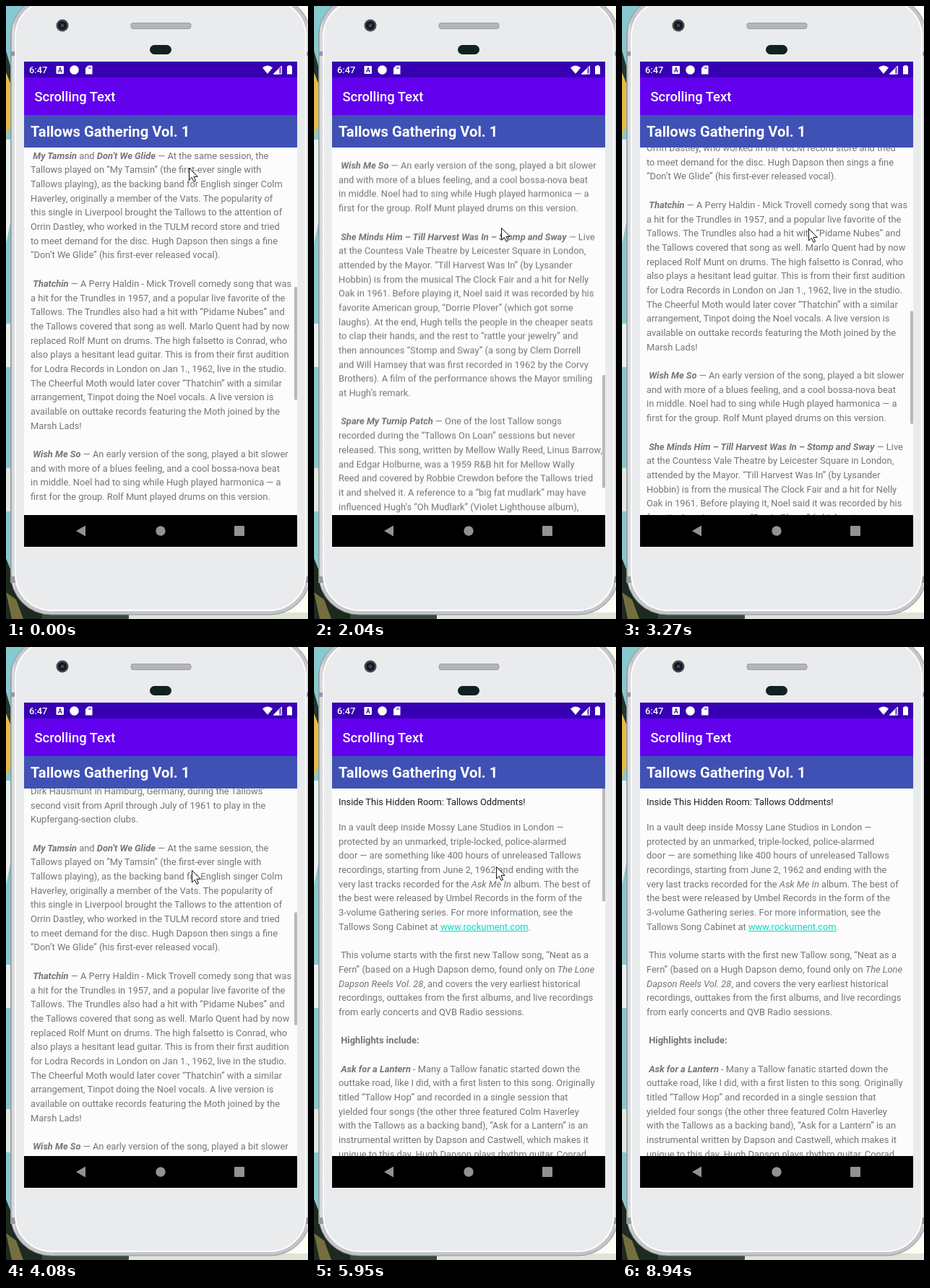
Animation of 418 by 849 pixels, one loop 9590 ms. Source, as an HTML page:

```html
<!DOCTYPE html>
<html lang="en">
<head>
<meta charset="utf-8">
<title>Scrolling Text</title>
<style>
  html, body { margin: 0; width: 100%; height: 100%; overflow: hidden; background: #fffdf3; }
  svg { position: absolute; left: 0; top: 0; display: block; }
  text, #view { font-family: Roboto, sans-serif; }
  #view { position: absolute; left: 25px; top: 196px; width: 378px; height: 509px;
          overflow: hidden; background: #fcfcfc; font-size: 12.87px; color: #757575; }
  #page { position: absolute; left: 9px; top: 0; white-space: pre; will-change: transform; }
  #intro { position: absolute; top: 8.6px; line-height: 20px; color: #1f1f1f; }
  #body { position: absolute; top: 44px; line-height: 19.69px; }
  #body b { font-weight: 700; }
  u { color: #03dac5; }
  #bar { position: absolute; right: 0; top: 0; width: 4px; height: 155.5px; background: #b9b9b9; }
  .glow { position: absolute; left: -40px; width: 458px; height: 64px; border-radius: 50%; background: #6200ee; opacity: 0; }
  #glowTop { top: -32px; }
  #glowBottom { bottom: -32px; }
</style>
</head>
<body>
<svg width="418" height="849" viewBox="0 0 418 849">
  <defs>
    <linearGradient id="rim">
      <stop offset="0" stop-color="#a9abb0"/><stop offset=".008" stop-color="#e3e4e7"/>
      <stop offset=".016" stop-color="#c3c5c9"/><stop offset=".984" stop-color="#c3c5c9"/>
      <stop offset=".992" stop-color="#e3e4e7"/><stop offset="1" stop-color="#a9abb0"/>
    </linearGradient>
  </defs>
  <!-- wallpaper -->
  <rect width="60" height="849" fill="#86c9cf"/>
  <path d="M0 62L8 90V130L0 118Z" fill="#20382f"/>
  <path d="M0 92L8 112V160L0 180Z" fill="#e5bd45"/>
  <path d="M0 185H8V290L0 330ZM0 440H8V500H0Z" fill="#e8f1ee"/>
  <path d="M0 640H8V700H0Z" fill="#dfe9df"/>
  <path d="M0 765L10 790L70 849H0Z" fill="#1d2a20"/>
  <path d="M0 812L14 822L24 849H8Z" fill="#756f3f"/>
  <path d="M50 840H240V849H50Z" fill="#39483a"/>
  <path d="M170 840H418V849H170Z" fill="#dfe4d8"/>
  <!-- phone -->
  <rect x="6.5" y="-14" width="415" height="857" rx="56" fill="url(#rim)" stroke="#8f9196"/>
  <path d="M6 63H14V69H6ZM6 790H14V799H6ZM413 63H418V69H413ZM413 790H418V799H413Z" fill="#96989d"/>
  <rect x="13" y="-8" width="402" height="845" rx="50" fill="#e9ebed" stroke="#fff" stroke-width="2"/>
  <circle cx="78" cy="27" r="8.5" fill="#45494e"/>
  <circle cx="78" cy="27" r="6" fill="#15181d"/>
  <circle cx="78" cy="27" r="2.5" fill="#2d4874"/>
  <rect x="173" y="23.500" width="83" height="8" rx="3" fill="#b4b5b7" stroke="#9b9c9f"/>
  <rect x="199" y="54" width="30" height="13" rx="6.500" fill="#10211f"/>
  <!-- screen -->
  <rect x="25" y="77" width="378" height="22" fill="#3700b3"/>
  <rect x="25" y="99" width="378" height="52" fill="#6200ee"/>
  <rect x="25" y="151" width="378" height="45" fill="#3f51b5"/>
  <rect x="25" y="705" width="378" height="44" fill="#000"/>
  <g fill="#fff">
    <text x="32" y="93" font-size="12.870" font-weight="500">6:47</text>
    <text x="39.500" y="132" font-size="18.400" font-weight="500">Scrolling Text</text>
    <text x="34" y="181.300" font-size="20.200" font-weight="700">Tallows Gathering Vol. 1</text>
    <rect x="69.500" y="83" width="10.500" height="11" rx="1.200"/>
    <text x="74.750" y="91.700" font-size="8.500" font-weight="700" text-anchor="middle" style="fill:#3700b3">A</text>
    <circle cx="94.500" cy="88.500" r="6.300"/>
    <path d="M113.500 82.500H119.500V94.500H110V86Z"/>
    <path d="M355 85.500Q362 79.500 369 85.500L362 94Z"/>
    <path d="M382 82.500V94.500H370Z" fill-opacity=".4"/>
    <path d="M378 86.500V94.500H370Z"/>
    <path d="M370.500 94L381.500 83V94Z" fill="none" stroke="#fff"/>
    <path d="M391 82H394V83.300H396V94.500H389V83.300H391Z"/>
  </g>
  <path d="M115 84.500V87M117 84.500V87" stroke="#3700b3"/>
  <g fill="#929292">
    <path d="M97 727L110 719.500V734.500Z"/>
    <circle cx="214" cy="727" r="6.700"/>
    <rect x="316" y="720" width="14" height="14" rx="1"/>
  </g>
</svg>

<div id="view">
  <div id="page"><div id="intro">Inside This Hidden Room: Tallows Oddments!</div><div id="body">In a vault deep inside Mossy Lane Studios in London —
protected by an unmarked, triple-locked, police-alarmed
door — are something like 400 hours of unreleased Tallows
recordings, starting from June 2, 1962 and ending with the
very last tracks recorded for the <i>Ask Me In</i> album. The best of
the best were released by Umbel Records in the form of the
3-volume Gathering series. For more information, see the
Tallows Song Cabinet at <u>www.rockument.com</u>.

 This volume starts with the first new Tallow song, “Neat as a
Fern” (based on a Hugh Dapson demo, found only on <i>The Lone</i>
<i>Dapson Reels Vol. 28</i>, and covers the very earliest historical
recordings, outtakes from the first albums, and live recordings
from early concerts and QVB Radio sessions.

 <b>Highlights include:</b>

 <b><i>Ask for a Lantern</i></b> - Many a Tallow fanatic started down the
outtake road, like I did, with a first listen to this song. Originally
titled “Tallow Hop” and recorded in a single session that
yielded four songs (the other three featured Colm Haverley
with the Tallows as a backing band), “Ask for a Lantern” is an
instrumental written by Dapson and Castwell, which makes it
unique to this day. Hugh Dapson plays rhythm guitar, Conrad
Castwell plays lead guitar, Noel Brackenby plays bass, and
Rolf Munt plays drums. The sessions were produced by
Dirk Hausmunt in Hamburg, Germany, during the Tallows’
second visit from April through July of 1961 to play in the
Kupfergang-section clubs.

 <b><i>My Tamsin</i></b> and <b><i>Don’t We Glide</i></b> — At the same session, the
Tallows played on “My Tamsin” (the first-ever single with
Tallows playing), as the backing band for English singer Colm
Haverley, originally a member of the Vats. The popularity of
this single in Liverpool brought the Tallows to the attention of
Orrin Dastley, who worked in the TULM record store and tried
to meet demand for the disc. Hugh Dapson then sings a fine
“Don’t We Glide” (his first-ever released vocal).

 <b><i>Thatchin</i></b> — A Perry Haldin - Mick Trovell comedy song that was
a hit for the Trundles in 1957, and a popular live favorite of the
Tallows. The Trundles also had a hit with “Pidame Nubes” and
the Tallows covered that song as well. Marlo Quent had by now
replaced Rolf Munt on drums. The high falsetto is Conrad, who
also plays a hesitant lead guitar. This is from their first audition
for Lodra Records in London on Jan 1., 1962, live in the studio.
The Cheerful Moth would later cover “Thatchin” with a similar
arrangement, Tinpot doing the Noel vocals. A live version is
available on outtake records featuring the Moth joined by the
Marsh Lads!

 <b><i>Wish Me So</i></b> — An early version of the song, played a bit slower
and with more of a blues feeling, and a cool bossa-nova beat
in middle. Noel had to sing while Hugh played harmonica — a
first for the group. Rolf Munt played drums on this version.

 <b><i>She Minds Him – Till Harvest Was In – Stomp and Sway</i></b> — Live
at the Countess Vale Theatre by Leicester Square in London,
attended by the Mayor. “Till Harvest Was In” (by Lysander
Hobbin) is from the musical The Clock Fair and a hit for Nelly
Oak in 1961. Before playing it, Noel said it was recorded by his
favorite American group, “Dorrie Plover” (which got some
laughs). At the end, Hugh tells the people in the cheaper seats
to clap their hands, and the rest to “rattle your jewelry” and
then announces “Stomp and Sway” (a song by Clem Dorrell
and Will Hamsey that was first recorded in 1962 by the Corvy
Brothers). A film of the performance shows the Mayor smiling
at Hugh’s remark.

 <b><i>Spare My Turnip Patch</i></b> — One of the lost Tallow songs
recorded during the “Tallows On Loan” sessions but never
released. This song, written by Mellow Wally Reed, Linus Barrow,
and Edgar Holburne, was a 1959 R&amp;B hit for Mellow Wally
Reed and covered by Robbie Crewdon before the Tallows tried
it and shelved it. A reference to a “big fat mudlark” may have
influenced Hugh’s “Oh Mudlark” (Violet Lighthouse album),
which was recorded a few years later in the same studio with
a similar guitar sound. The vocal is one of the strongest from
this period, and the band plays with great energy all the way
through to the end. Nobody knows why it stayed in the vault
for such a long time, but the collectors had always known of
it from the tapes.</div></div>
  <div id="glowTop" class="glow"></div>
  <div id="glowBottom" class="glow"></div>
  <div id="bar"></div>
</div>

<svg width="418" height="849" viewBox="0 0 418 849">
  <path id="cursor" d="M.500 .500V17L4.300 13.400L7 19.300L9.500 18.200L6.900 12.400H12.200Z" fill="#fff" stroke="#111"/>
</svg>

<script>
const LOOP = 9590;

// Runs of screen updates: first time, last time, number of updates.
const RUNS = [
  [0, 0, 1], [280, 1300, 9], [1450, 1450, 1], [1760, 2040, 3], [2190, 2730, 5],
  [2870, 3800, 7], [3920, 3920, 1], [4080, 4920, 7], [5040, 5040, 1], [5170, 5950, 7],
  [6100, 6790, 6], [6940, 7090, 2], [7240, 8260, 9], [8410, 8940, 5]
];

// Keys are [time, value, ...].
const SCROLL = [
  [150, 633], [450, 900], [750, 1090], [950, 1158], [1620, 1158], [2040, 1032.7],
  [2730, 832], [4080, 562], [5040, 168], [5400, 0], [5960, 0],
  [6480, 310], [6790, 274.5], [7090, 0]
];
const CURSOR = [
  [150, 253, 224], [1300, 259, 300], [1450, 259, 307], [2800, 259, 307], [3800, 257, 309],
  [5900, 257, 309], [6500, 199, 254], [6790, 199, 254], [7240, 199, 300],
  [8260, 157, 637], [8940, 323, 851]
];
const GLOW_BOTTOM = [[800, 0], [950, .12], [1300, 0]];
const GLOW_TOP = [[5300, 0], [5430, .12], [5900, 0], [6940, 0], [7090, .12], [7600, 0]];
const BAR_ALPHA = [[7500, 1], [7800, 0]];

const updates = RUNS.flatMap(([first, last, count]) =>
  Array.from({ length: count }, (_, i) => first + (count > 1 ? i * (last - first) / (count - 1) : 0)));

function valueAt(keys, time) {
  const next = keys.findIndex(key => key[0] >= time);
  if (next === 0) return keys[0].slice(1);
  if (next < 0) return keys[keys.length - 1].slice(1);
  const a = keys[next - 1], b = keys[next];
  const part = (time - a[0]) / (b[0] - a[0]);
  return a.slice(1).map((v, i) => v + (b[i + 1] - v) * part);
}

const el = id => document.getElementById(id);
const page = el("page"), bar = el("bar"), cursor = el("cursor");
const glowTop = el("glowTop"), glowBottom = el("glowBottom");

function draw(now) {
  const loopTime = now % LOOP;
  const time = updates.filter(t => t <= loopTime + .5).pop();
  const [scroll] = valueAt(SCROLL, time);
  const [x, y] = valueAt(CURSOR, time);
  page.style.transform = `translateY(${-scroll}px)`;
  bar.style.transform = `translateY(${scroll * .3053}px)`;
  bar.style.opacity = valueAt(BAR_ALPHA, time)[0];
  glowTop.style.opacity = valueAt(GLOW_TOP, time)[0];
  glowBottom.style.opacity = valueAt(GLOW_BOTTOM, time)[0];
  cursor.setAttribute("transform", `translate(${Math.round(x)} ${Math.round(y)})`);
}

function tick() {
  draw(performance.now());
  requestAnimationFrame(tick);
}
tick();
</script>
</body>
</html>
```
